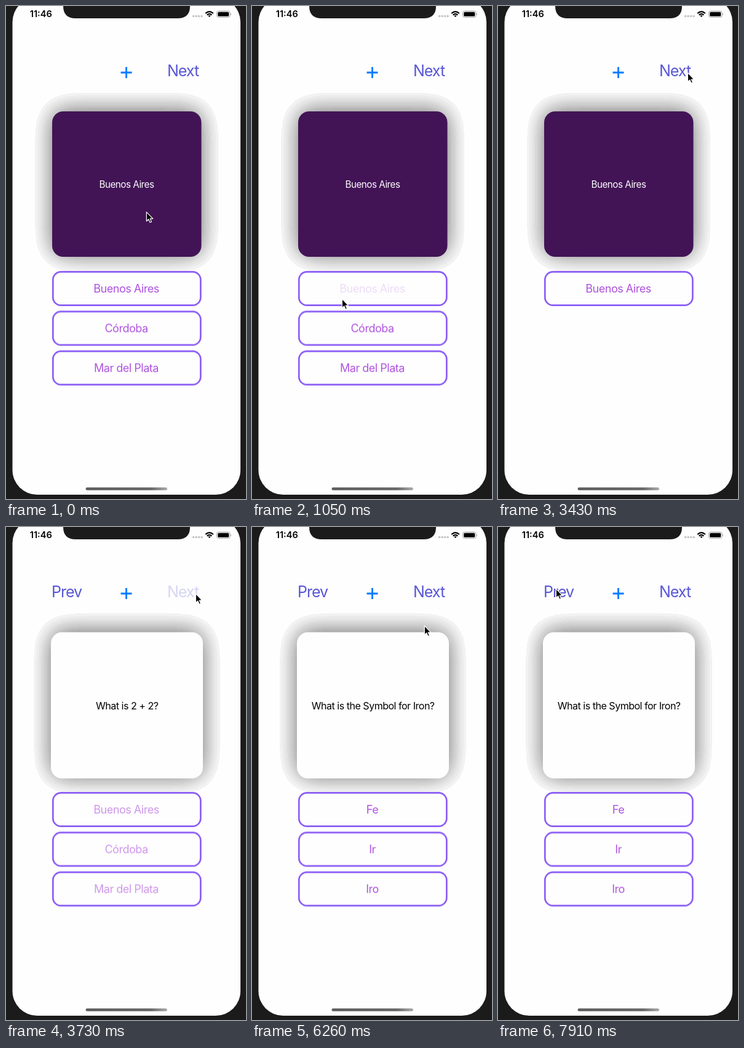
These frames come from a looping animation (390x800 px, 8 s). An HTML page:

```html
<!DOCTYPE html>
<html lang="en">
<head>
<meta charset="utf-8">
<title>Flash cards</title>
<style>
html, body { margin: 0; width: 100%; height: 100%; overflow: hidden; background: #1b1b1b; }
svg { display: block; width: 390px; height: 800px; font-family: Inter, "Open Sans", sans-serif; letter-spacing: -.03em; }
text { text-anchor: middle; }
.nav { font-size: 25px; letter-spacing: -.04em; fill: #5856d6; text-anchor: start; }
.opt { font-size: 18px; fill: #af52de; }
.box { fill: #fefefe; stroke: #8b5cf6; stroke-width: 2.7; }
.ask { font-size: 16px; fill: #000; }
.ans { font-size: 15.2px; fill: #fff; }
.shade { filter: url(#soft); }

[class^="k-"] { animation: 8s step-end infinite; }
.k-cursor { animation-name: cursor; }
.k-front { animation-name: front; }
.k-back { animation-name: back; }
.k-set1 { animation-name: set1; }
.k-set2 { animation-name: set2; }
.k-set3 { animation-name: set3; }
.k-card1 { animation-name: card1; }
.k-card2 { animation-name: card2; }
.k-card3 { animation-name: card3; }
.k-later { animation-name: later; }
.k-next { animation-name: next; }
.k-tap1 { animation-name: tap1; }
.k-tap2 { animation-name: tap2; }
.k-tap3 { animation-name: tap3; }
.k-row2 { animation-name: row2; }
.k-row3 { animation-name: row3; }

@keyframes cursor {
  0% { transform: translate(228px, 334px); }
  9.35% { transform: translate(188px, 402px); }
  11.22% { transform: translate(146px, 475px); }
  18.6% { transform: translate(142px, 522px); }
  20.48% { transform: translate(140px, 562px); }
  25.98% { transform: translate(138px, 541px); }
  31.6% { transform: translate(128px, 585px); }
  39.1% { transform: translate(228px, 400px); }
  40.97% { transform: translate(338px, 202px); }
  42.85% { transform: translate(308px, 108px); }
  78.22% { transform: translate(280px, 160px); }
  80.1% { transform: translate(226px, 252px); }
  81.97% { transform: translate(200px, 295px); }
  95.1% { transform: translate(160px, 232px); }
  96.97% { transform: translate(106px, 126px); }
  98.85%, 100% { transform: translate(94px, 100px); }
}
@keyframes front {
  0%, 7.48%, 83.85% { opacity: 0; }
  3.73%, 46.6%, 91.35%, 100% { opacity: 1; }
}
@keyframes back {
  0%, 7.48%, 83.85% { opacity: 1; }
  3.73%, 46.6%, 91.35%, 100% { opacity: 0; }
}
@keyframes card1 { 0% { opacity: 1; } 46.6%, 100% { opacity: 0; } }
@keyframes card2 { 0%, 61.48%, 100% { opacity: 0; } 46.6% { opacity: 1; } }
@keyframes card3 { 0% { opacity: 0; } 61.48%, 100% { opacity: 1; } }
@keyframes later { 0% { opacity: 0; } 46.6%, 100% { opacity: 1; } }
@keyframes set1 { 0% { opacity: 1; } 46.6% { opacity: .6; } 48.48%, 100% { opacity: 0; } }
@keyframes set2 {
  0%, 63.23%, 100% { opacity: 0; }
  48.48%, 61.48% { opacity: .6; }
  50.22% { opacity: 1; }
}
@keyframes set3 {
  0% { opacity: 0; }
  63.23% { opacity: .5; }
  65.1% { opacity: .8; }
  66.98%, 100% { opacity: 1; }
}
@keyframes next {
  0%, 50.22%, 66.98%, 100% { opacity: 1; }
  46.6%, 61.48% { opacity: .24; }
  48.48%, 63.23% { opacity: .45; }
  65.1% { opacity: .78; }
}
@keyframes tap1 { 0%, 16.85%, 100% { opacity: 1; } 13.1% { opacity: .2; } 14.97% { opacity: .6; } }
@keyframes tap2 { 0%, 29.73%, 100% { opacity: 1; } 27.85% { opacity: .2; } }
@keyframes tap3 { 0%, 35.35%, 100% { opacity: 1; } 33.48% { opacity: .2; } }
@keyframes row2 { 0%, 46.6%, 100% { opacity: 1; } 29.73% { opacity: 0; } }
@keyframes row3 { 0%, 46.6%, 100% { opacity: 1; } 35.35% { opacity: 0; } }
</style>
</head>
<body>
<svg viewBox="0 0 390 800">
  <defs>
    <!-- blurred shadow in visible bands -->
    <filter id="soft" x="-40%" y="-40%" width="180%" height="180%" color-interpolation-filters="sRGB">
      <feGaussianBlur in="SourceAlpha" stdDeviation="20"/>
      <feComponentTransfer>
        <feFuncA type="discrete" tableValues="0 0 .05 .075 .1 .125 .15 .173 .196 .219 .242 .265 .288 .31 .33 .35 .36 .36 .36 .36 .36 .36 .36 .36 .36 .36"/>
      </feComponentTransfer>
    </filter>
    <linearGradient id="bar">
      <stop offset="0" stop-color="#5c5c5c"/>
      <stop offset=".8" stop-color="#666"/>
      <stop offset="1" stop-color="#aaa"/>
    </linearGradient>
    <rect id="box" class="box" x="76.3" y="431.3" width="240" height="54.4" rx="13"/>
  </defs>

  <rect width="390" height="800" fill="#1b1b1b"/>
  <rect x="10.5" y="-14" width="370.5" height="807" rx="40" fill="#fefefe"/>
  <path d="M93-5V0Q93 20 113 20H279Q299 20 299 0V-5Z" fill="#1b1b1b"/>

  <text x="56.8" y="18" font-size="14.6" font-weight="600" letter-spacing="0">11:46</text>
  <g fill="#c4c4c6">
    <circle cx="304.6" cy="16.5" r="1.8"/><circle cx="309.1" cy="16.5" r="1.8"/>
    <circle cx="313.6" cy="16.5" r="1.8"/><circle cx="318.1" cy="16.5" r="1.8"/>
  </g>
  <g fill="none" stroke="#000" stroke-width="2.1">
    <path d="M324.2 12Q330.5 6.2 336.8 12"/>
    <path d="M326.7 14.6Q330.5 11.2 334.3 14.6"/>
    <path d="M328.5 15.9Q330.5 14.3 332.5 15.9L330.5 18Z" fill="#000" stroke="none"/>
  </g>
  <rect x="342.5" y="8.2" width="21.5" height="10.2" rx="3" fill="none" stroke="#a0a0a0"/>
  <rect x="344.2" y="9.8" width="18" height="7" rx="1.6"/>
  <path d="M365 11.5Q367 13.3 365 15.1Z" fill="#a0a0a0"/>
  <rect x="129.5" y="781.2" width="132.5" height="4.6" rx="2.3" fill="url(#bar)"/>

  <g class="k-front">
    <rect class="shade" x="73" y="168" width="247" height="237.5" rx="18"/>
    <rect x="73" y="170.7" width="247" height="237.3" rx="18" fill="#fefefe"/>
    <g class="ask">
      <text class="k-card1" x="196.7" y="295.5">What is the Capital of Argentina?</text>
      <text class="k-card2" x="196.7" y="295.5">What is 2 + 2?</text>
      <text class="k-card3" x="196.7" y="295.5">What is the Symbol for Iron?</text>
    </g>
  </g>
  <g class="k-back">
    <rect class="shade" x="75" y="168.5" width="242.5" height="236" rx="18"/>
    <rect x="75" y="171" width="242.5" height="236" rx="18" fill="#421456"/>
    <g class="ans">
      <text class="k-card1" x="196" y="294.5">Buenos Aires</text>
      <text class="k-card3" x="196" y="294.5">Fe</text>
    </g>
  </g>

  <g class="nav">
    <g class="k-later"><text class="nav" x="74" y="114">Prev</text></g>
    <g class="k-next"><text class="nav" x="262" y="114">Next</text></g>
  </g>
  <path d="M186.5 108H204.5M195.5 99V117" stroke="#007aff" stroke-width="2.8"/>

  <g class="opt">
    <use href="#box"/>
    <g class="k-set1"><text class="k-tap1" x="195.5" y="465">Buenos Aires</text></g>
    <text class="k-set2" x="195.5" y="465">4</text>
    <text class="k-set3" x="195.5" y="465">Fe</text>
  </g>
  <g class="opt" transform="translate(0 64.4)">
    <g class="k-row2">
      <use href="#box"/>
      <g class="k-set1"><text class="k-tap2" x="195.5" y="465">Córdoba</text></g>
      <text class="k-set2" x="195.5" y="465">1</text>
      <text class="k-set3" x="195.5" y="465">Ir</text>
    </g>
  </g>
  <g class="opt" transform="translate(0 128.8)">
    <g class="k-row3">
      <use href="#box"/>
      <g class="k-set1"><text class="k-tap3" x="195.5" y="465">Mar del Plata</text></g>
      <text class="k-set2" x="195.5" y="465">3</text>
      <text class="k-set3" x="195.5" y="465">Iro</text>
    </g>
  </g>

  <g class="k-cursor">
    <path d="M.3 .3V15.2L3.7 12 6 17.3 8.5 16.2 6.2 11.1H10.8Z" fill="#000" stroke="#fff" stroke-width="1.2" stroke-linejoin="round"/>
  </g>
</svg>
</body>
</html>
```
